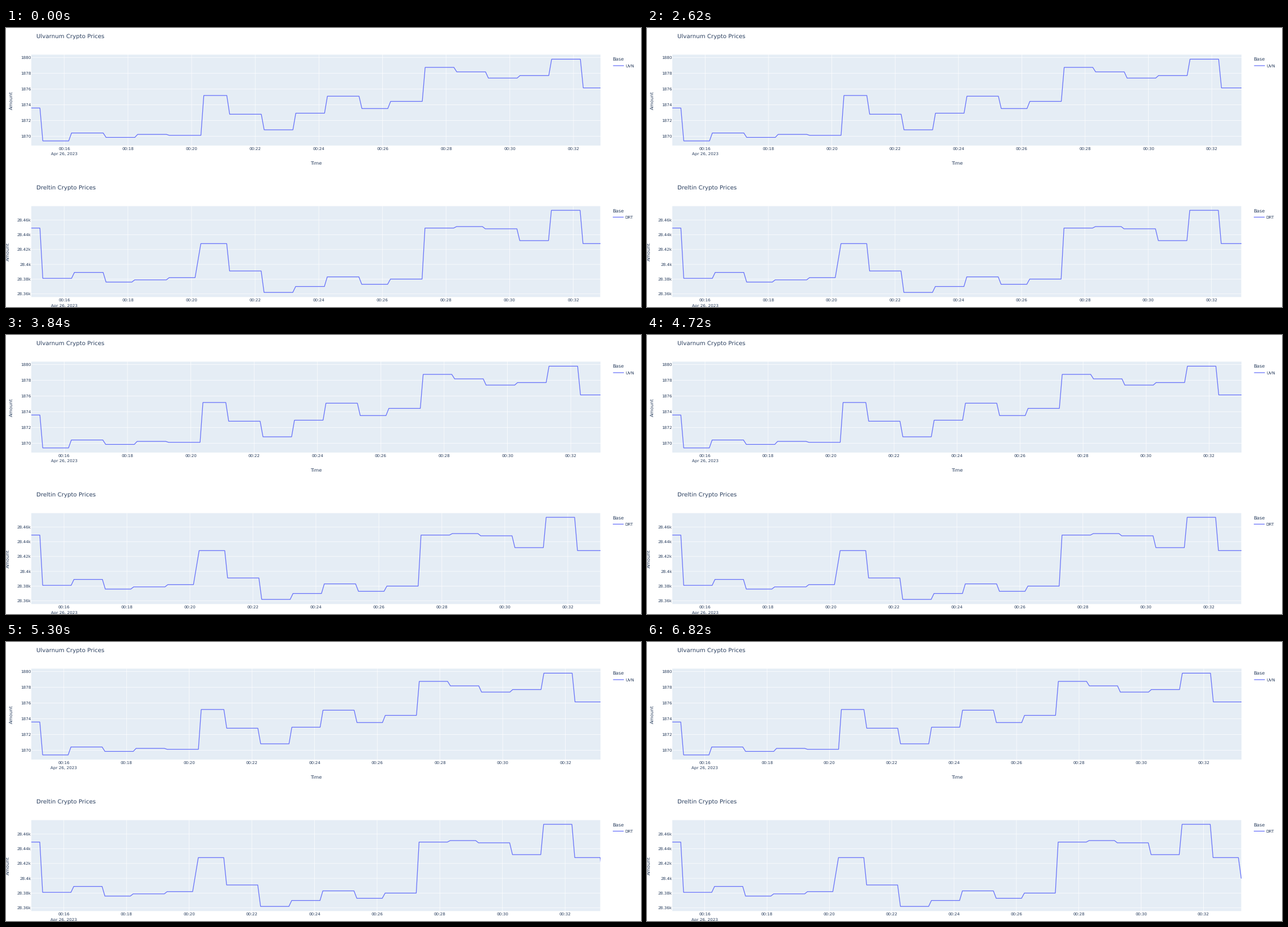
Recreate the animation shown at these times as a matplotlib script. Size 1129 by 496 pixels, loop 8000 ms.

```python
import matplotlib.pyplot as plt
from matplotlib.animation import FuncAnimation
from matplotlib.patches import Rectangle

W, H, DPI = 1129, 496, 64
STEP, LOOP = 20, 8000
PT = 72 / DPI
LEFT, TALL = 45, 161.6
SAMPLES = 198                      # samples across the first view
START, MINUTE = 14.9625, 11.07     # left edge in minutes, samples per minute
INK, PAPER, BLUE = "#2a3f5f", "#e5edf5", "#636efa"

plt.rcParams["font.family"] = "DejaVu Sans"
plt.rcParams["text.hinting"] = "none"
plt.rcParams["path.snap"] = False

fig = plt.figure(figsize=(W / DPI, H / DPI), dpi=DPI, facecolor="white")
ax = fig.add_axes([0, 0, 1, 1])
ax.set_xlim(0, W)
ax.set_ylim(H, 0)
ax.axis("off")


def label(x, y, text, size=7.2, ha="left"):
    """Text whose capitals are centred on y."""
    return ax.text(x, y + 0.36 * size, text, size=size * PT, color=INK,
                   ha=ha, va="baseline")


def stroke(xs, ys, color, width, **kw):
    return ax.plot(xs, ys, color=color, lw=width * PT, **kw)[0]


def price_path(prices, shift, slow):
    """Roughly one jump a minute, each ramping over one sample (two if slow)."""
    path = [(0, prices[0])]
    for i, (old, new) in enumerate(zip(prices, prices[1:])):
        at = round(3 + 11.055 * i) + shift.get(i, 0)
        path += [(at, old), (at + 1 + (i == slow), new)]
    path.append((path[-1][0] + SAMPLES, prices[-1]))
    return zip(*path)


class Panel:
    def __init__(self, top, width, name, ticker, amount_x, high, gap, grid,
                 tick_text, prices, changes, shift, slow=None):
        self.width, self.changes = width, changes
        base, right = top + TALL, LEFT + width
        box = Rectangle((LEFT, top), width, TALL, fc=PAPER, ec="none")
        ax.add_patch(box)

        first = top + grid[0]
        for i in range(6):
            y = first + grid[1] * i
            stroke([LEFT, right], [y, y], "white", 0.7)
            label(44.5, y, tick_text(high - gap * i), ha="right")

        self.ticks = []
        for m in range(16, 34, 2):
            line = stroke([0, 0], [top, base], "white", 0.7)
            text = label(0, base + 5.2, f"00:{m}", ha="center")
            self.ticks.append(((m - START) * MINUTE, line, text))
        self.date = label(0, base + 14.4, "Apr 26, 2023", ha="center")

        self.xs, values = price_path(prices, shift, slow)
        ys = [first + (high - v) * grid[1] / gap for v in values]
        self.curve = stroke(self.xs, ys, BLUE, 1.25, zorder=3,
                            solid_joinstyle="miter", solid_capstyle="butt")
        self.curve.set_clip_path(box)

        label(53.5, top - 33.4, f"{name} Crypto Prices", 10.2)
        ax.text(amount_x + 3, top + TALL / 2, "Amount", size=8.4 * PT,
                color=INK, rotation=90, rotation_mode="anchor",
                ha="center", va="baseline")
        label(right + 21.6, top + 7.7, "Base", 8.4)
        stroke([right + 23, right + 41], [top + 19.6] * 2, BLUE, 1.25)
        label(right + 44.2, top + 19.6, ticker)

    def update(self, t):
        view = SAMPLES + sum(t >= c for c in self.changes)
        scale = self.width / view
        self.curve.set_xdata([LEFT + x * scale for x in self.xs])
        for x, line, text in self.ticks:
            px = LEFT + x * scale
            line.set_xdata([px, px])
            text.set_x(px)
        self.date.set_x(LEFT + self.ticks[0][0] * scale)


upper = Panel(
    47.4, 1012, "Ulvarnum", "UVN", 8.7, 1880, 2, (5.1, 28), str,
    [1873.59, 1869.41, 1870.42, 1869.86, 1870.24, 1870.12, 1875.18, 1872.8,
     1870.82, 1872.93, 1875.09, 1873.52, 1874.43, 1878.75, 1878.18, 1877.39,
     1877.71, 1879.79, 1876.14],
    (800, 3860, 5300, 6820), {1: -1, 5: 1, 6: -1, 11: -1})

lower = Panel(
    316.7, 1011.5, "Dreltin", "DRT", 3, 28460, 20, (24.5, 26.3),
    lambda v: f"{v / 1000:.4g}k",
    [28449, 28381, 28389, 28376, 28379, 28382, 28428, 28391, 28362, 28370,
     28383, 28373, 28380, 28449, 28451, 28448, 28432, 28473, 28428, 28400],
    (800, 3840, 5300, 6820),
    {3: -1, 5: -1, 6: -1, 11: -1, 14: -1, 18: -1}, slow=5)

label(551, 239.5, "Time", 8.4, ha="center")


def draw(i):
    for panel in (upper, lower):
        panel.update(i * STEP)
    return []


anim = FuncAnimation(fig, draw, frames=LOOP // STEP, interval=STEP,
                     repeat=True, repeat_delay=0, blit=False)
plt.show()
```
